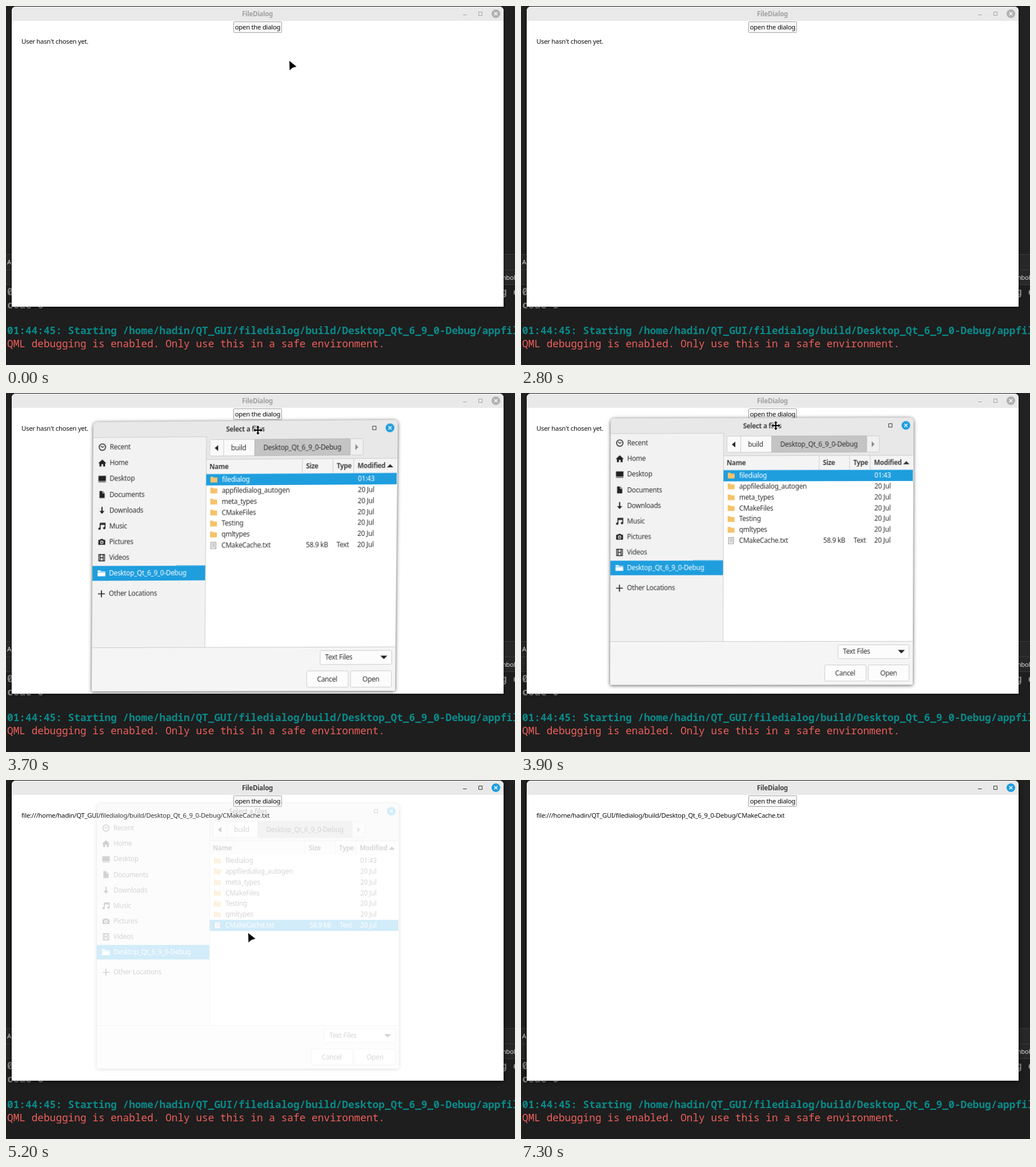
Write an HTML page that moves like this. It is 891x628 px and loops after 8 s.

```html
<!DOCTYPE html>
<html lang="en">
<head>
<meta charset="utf-8">
<style>
html, body { margin: 0; width: 100%; height: 100%; overflow: hidden; background: #212121; }
svg { position: absolute; left: 0; top: 0; overflow: visible; }
#stage { position: relative; width: 891px; height: 628px; overflow: hidden; }
text { font: 11.8px "Noto Sans", "Open Sans", sans-serif; letter-spacing: -.28px; fill: #303030; white-space: pre; }
.bold { font-size: 11.6px; font-weight: 600; letter-spacing: -.35px; fill: #444; }
.app { font-size: 11.4px; letter-spacing: -.3px; fill: #111; }
.mono { font: 17.78px "Noto Sans Mono", monospace; letter-spacing: 0; }
.strong { font-weight: 700; }
.mid { text-anchor: middle; }
#dialog { transform-origin: 0 0; }
#panel { filter: drop-shadow(0 1px 3px #000a); }
#frame { filter: drop-shadow(0 1px 2px #0008); }
</style>
</head>
<body>
<div id="stage">
  <svg id="desk" width="891" height="628"></svg>
  <svg id="dialog" width="529" height="464" viewBox="159 41 529 464"></svg>
  <svg id="pointer" width="20" height="20">
    <path id="arrow" d="M0 0L12.5 10 5.5 12 .5 16.5Z" stroke="#fff" stroke-width="2" stroke-linejoin="round" paint-order="stroke"/>
    <path id="mover" d="M0-8L3-4.5H1V-1H4.5V-3L8 0 4.5 3V1H1V4.5H3L0 8-3 4.5H-1V1H-4.5V3L-8 0-4.5-3V-1H-1V-4.5H-3Z" stroke="#fff" stroke-width="1.6" paint-order="stroke"/>
  </svg>
</div>
<script>
const $ = id => document.getElementById(id);
const BLUE = '#1f9ede';
const LOOP = 8000;

const rect = (x, y, w, h, fill, more = '') =>
  `<rect x="${x}" y="${y}" width="${w}" height="${h}" fill="${fill}" ${more}/>`;
const box = (x, y, w, h, fill, line, r = 2) =>
  rect(x + .5, y + .5, w - 1, h - 1, fill, `stroke="${line}" rx="${r}"`);
const path = (d, fill, more = '') => `<path d="${d}" fill="${fill}" ${more}/>`;
const text = (x, y, s, cls = '', more = '') =>
  `<text x="${x}" y="${y + 4}" class="${cls}" ${more}>${s}</text>`;
const mono = (x, y, s, fill, cls = 'strong') => text(x, y + 2, s, 'mono ' + cls, `style="fill:${fill}"`);
const at = (x, y, s) => `<g transform="translate(${x} ${y})">${s}</g>`;
const closeButton = (x, y, id = '') =>
  `<circle ${id} cx="${x}" cy="${y}" r="7.6" fill="${BLUE}"/>` +
  path(`M${x - 2.8} ${y - 2.8}l5.6 5.6m0-5.6l-5.6 5.6`, 'none', 'stroke="#fff" stroke-width="1.3"');

$('desk').innerHTML =
  rect(0, 0, 891, 628, '#212121') +
  rect(0, 434, 891, 54, '#272727') +
  [434, 461, 487].map(y => rect(0, y, 891, 1, '#3b3b3b')).join('') +
  rect(0, 488, 891, 140, '#1e1e1e') +
  text(2, 448, 'A', 'app', 'style="fill:#ddd"') +
  text(865, 475, 'mbol', 'app', 'style="fill:#ddd"') +
  mono(2, 500, '01:44:42', '#858585') + mono(866, 500, 'g c', '#858585') +
  mono(2, 523, 'code 0', '#858585') +
  mono(2, 568, '01:44:45: Starting /home/hadin/QT_GUI/filedialog/build/Desktop_Qt_6_9_0-Debug/appfiledialog', '#0a8a8a') +
  mono(2, 591, 'QML debugging is enabled. Only use this in a safe environment.', '#ee5f5b', '') +
  path('M10 526V9Q10 1 18 1H863Q871 1 871 9V526Z', '#fff', 'id="frame"') +
  path('M10 26V9Q10 1 18 1H863Q871 1 871 9V26Z', '#e9e9e9') +
  text(440, 14, 'FileDialog', 'bold mid', 'id="title"') +
  path('M800 15.5h6.5M827.5 10.5h6v6h-6z', 'none', 'id="symbols"') +
  closeButton(857.5, 13.5, 'id="close"') +
  box(398, 27, 85, 20, '#f7f7f7', '#a3a3a3', 1) +
  text(440.5, 37, 'open the dialog', 'app mid') +
  text(27, 62, '', 'app', 'id="status"');

const places = [
  ['Recent', '<circle r="5.6" fill="none" stroke="#222" stroke-width="1.5"/><path d="M-3-2L0 .5 3-1.5" fill="none" stroke="#222" stroke-width="1.3"/>'],
  ['Home', path('M0-6L7 .5H5V6H1.5V2H-1.5V6H-5V.5H-7Z', '#222')],
  ['Desktop', rect(-6.5, -5, 13, 9, '#222') + rect(-6.5, 5, 13, 1, '#222')],
  ['Documents', path('M-4.5-6H1L4.5-2.5V6H-4.5Z', '#222') + path('M1-6V-2.5H4.5', 'none', 'stroke="#f2f2f2"')],
  ['Downloads', path('M-1-6H1V1H4.5L0 6-4.5 1H-1Z', '#222')],
  ['Music', path('M-3-5H5.5V3.5M-3-5V4.5M-3-3H5.5', 'none', 'stroke="#222" stroke-width="1.6"') +
    '<circle cx="-4.2" cy="4.3" r="2" fill="#222"/><circle cx="4.2" cy="3.3" r="2" fill="#222"/>'],
  ['Pictures', path('M-6-3.5H-3L-2-5H2L3-3.5H6V5H-6Z', '#222') + '<circle cy=".7" r="2.2" fill="none" stroke="#f2f2f2" stroke-width="1.4"/>'],
  ['Videos', path('M-5-5.5H5V5.5H-5ZM-2.5-5.5V5.5M2.5-5.5V5.5M-2.5 0H2.5', 'none', 'stroke="#222" stroke-width="1.4"')],
  ['Desktop_Qt_6_9_0-Debug', path('M-7-5H-2L-1-3.5H6.5V5H-7Z', '#fff') + rect(-7, -2.6, 13.5, .8, BLUE)],
];
const rowY = i => 141 + 18.85 * i;
const folder = path('M-6-5H-1.5L-.5-3.5H6V5H-6Z', '#f6c26b');
const sheet = box(-5, -6, 10, 12, '#f4f4f4', '#999', 0) +
  path('M-2.5-3H3M-2.5-.5H3M-2.5 2H3', 'none', 'stroke="#999"');
const files = ['filedialog', 'appfiledialog_autogen', 'meta_types', 'CMakeFiles', 'Testing', 'qmltypes', 'CMakeCache.txt'];
const fileRow = (name, i) => {
  const y = rowY(i), isText = name.endsWith('.txt');
  return `<g>${at(370, y, isText ? sheet : folder)}${text(384, y, name)}` +
    (isText ? text(531, y, '58.9 kB') + text(584, y, 'Text') : '') +
    text(620, y, i ? '20 Jul' : '01:43') + '</g>';
};
const LINE = '#cdcdcd';

$('dialog').innerHTML =
  path('M159 503V49Q159 41 167 41H680Q688 41 688 49V503Q688 505 686 505H161Q159 505 159 503Z', '#f5f5f5', 'id="panel"') +
  path('M159 67V49Q159 41 167 41H680Q688 41 688 49V106H356V67Z', '#e8e8e8') +
  text(424, 55, 'Select a files', 'bold mid') +
  path('M644.5 51.5h6v6h-6z', 'none', 'stroke="#333"') + closeButton(674.5, 54.5) +
  rect(159, 67, 197, 362, '#f2f2f2') + rect(159, 67, 197, 1, LINE) +
  rect(356, 106, 331, 323, '#fff') + rect(356, 106, 331, 25, '#f4f4f4') +
  rect(356, 106, 331, 1, LINE) + rect(356, 67, 1, 362, LINE) + rect(159, 429, 529, 1, LINE) +
  [524, 577, 613].map(x => rect(x - 1, 107, 1, 24, LINE)).join('') +
  box(362, 72, 25, 29, '#fafafa', LINE) + box(386, 72, 55, 29, '#fafafa', LINE, 0) +
  box(606, 72, 23, 29, '#f0f0f0', LINE) + box(440, 72, 166, 29, '#c4c4c4', '#b8b8b8', 0) +
  path('M377 82V92L371 87Z', '#222') + path('M615 82V92L620 87Z', '#888') +
  text(412.5, 87, 'build', 'mid') + text(523, 87, 'Desktop_Qt_6_9_0-Debug', 'mid') +
  [[362, 'Name'], [530, 'Size'], [583, 'Type'], [619, 'Modified']].map(([x, s]) => text(x, 119, s, 'bold')).join('') +
  path('M670 122H681L675.5 116.5Z', '#333') +
  rect(159, 288.5, 197, 25.5, BLUE) +
  places.map(([name, icon], i) => {
    const y = 84 + 27.17 * i;
    return at(175, y, icon) + text(188, y, name, '', i == 8 ? 'style="fill:#fff"' : '');
  }).join('') +
  path('M169 336.5h12m-6-6v12', 'none', 'stroke="#222" stroke-width="1.7"') +
  text(188, 336, 'Other Locations') +
  rect(356.5, 0, 330.5, 19.5, BLUE, 'id="mark"') +
  `<g id="rows">${files.map(fileRow).join('')}</g>` +
  box(557, 435, 125, 25, '#fcfcfc', LINE) + text(566, 447, 'Text Files') + path('M662 444.5H674L668 450.5Z', '#222') +
  box(534, 470, 73, 29, '#fcfcfc', LINE) + text(570, 485, 'Cancel', 'mid') +
  box(610, 470, 72, 29, '#fcfcfc', LINE) + text(646, 485, 'Open', 'mid');

// Each key: time, then values
const pointerKeys = [
  [200, 496, 96], [600, 445, 40], [800, 440, 38], [1100, 213, 52],
  [3100, -40, 270], [3200, 150, 215], [3300, 290, 165], [3400, 363, 119], [3500, 400, 95],
  [3700, 441, 65], [3800, 446, 58], [3900, 446, 57],
  [4000, 442, 75], [4500, 411, 272], [4800, 424, 253], [5000, 424, 253], [5500, 424, 290],
  [5800, 424, 290], [5900, 423, 287], [6000, 421, 285], [6100, 421, 285],
  [6700, 156, 92], [6800, 156, 92], [7200, 15, 1],
];
// Top left, top right, bottom left, bottom right
const dialogKeys = [
  [3000, -560, 330, -20, 320, -575, 800, -40, 798],
  [3200, -150, 225, 410, 205, -165, 700, 375, 697],
  [3400, 50, 118, 594, 109, 36, 595, 569, 589],
  [3700, 153, 51, 686, 47, 150, 522, 681, 521],
  [4000, 159, 41, 688, 41, 159, 505, 688, 505],
];

function track(keys, t) {
  const next = keys.findIndex(k => k[0] > t);
  if (next < 1) return (next ? keys.at(-1) : keys[0]).slice(1);
  const a = keys[next - 1], b = keys[next], f = (t - a[0]) / (b[0] - a[0]);
  return a.slice(1).map((v, i) => v + (b[i + 1] - v) * f);
}

function quadTransform([x0, y0, x1, y1, x2, y2, x3, y3], w, h) {
  const ax = x1 - x3, ay = y1 - y3, bx = x2 - x3, by = y2 - y3;
  const sx = x0 - x1 - x2 + x3, sy = y0 - y1 - y2 + y3, det = ax * by - bx * ay;
  const p = (sx * by - bx * sy) / det, q = (ax * sy - sx * ay) / det;
  const m = [
    (x1 - x0 + p * x1) / w, (y1 - y0 + p * y1) / w, 0, p / w,
    (x2 - x0 + q * x2) / h, (y2 - y0 + q * y2) / h, 0, q / h,
    0, 0, 1, 0, x0, y0, 0, 1,
  ];
  return `matrix3d(${m.map(v => v.toFixed(9))})`;
}

function draw(now) {
  const t = Math.floor(now % LOOP / 100) * 100;
  const within = (from, to) => t >= from && t < to;
  const show = (el, on) => el.style.visibility = on ? 'visible' : 'hidden';

  const focused = within(700, 2800) || t >= 5100;
  $('title').style.fill = focused ? '#444' : '#a2a2a2';
  $('symbols').setAttribute('stroke', focused ? '#333' : '#a2a2a2');
  $('close').setAttribute('fill', focused ? BLUE : '#b1b1b1');
  $('frame').style.filter = focused ? 'drop-shadow(0 1px 4px #000a)' : '';
  $('status').textContent = t < 5100 ? "User hasn't chosen yet."
    : 'file:///home/hadin/QT_GUI/filedialog/build/Desktop_Qt_6_9_0-Debug/CMakeCache.txt';

  show($('dialog'), within(3100, 5300));
  $('dialog').style.opacity = t < 5100 ? 1 : t < 5200 ? .6 : .2;
  $('dialog').style.transform = quadTransform(track(dialogKeys, t), 529, 464);
  const selected = t < 4900 ? 0 : 6;
  $('mark').setAttribute('y', rowY(selected) - 9.5);
  [...$('rows').children].forEach((row, i) =>
    row.querySelectorAll('text').forEach(el => el.style.fill = i == selected ? '#fff' : ''));

  const dragging = within(3100, 4000);
  const [x, y] = track(pointerKeys, t);
  $('pointer').style.transform = `translate(${x}px, ${y}px)`;
  show($('mover'), dragging);
  show($('arrow'), !dragging && !within(1200, 3100) && t < 7300);
}

const start = performance.now();
(function tick() {
  draw(performance.now() - start);
  requestAnimationFrame(tick);
})();
</script>
</body>
</html>
```
